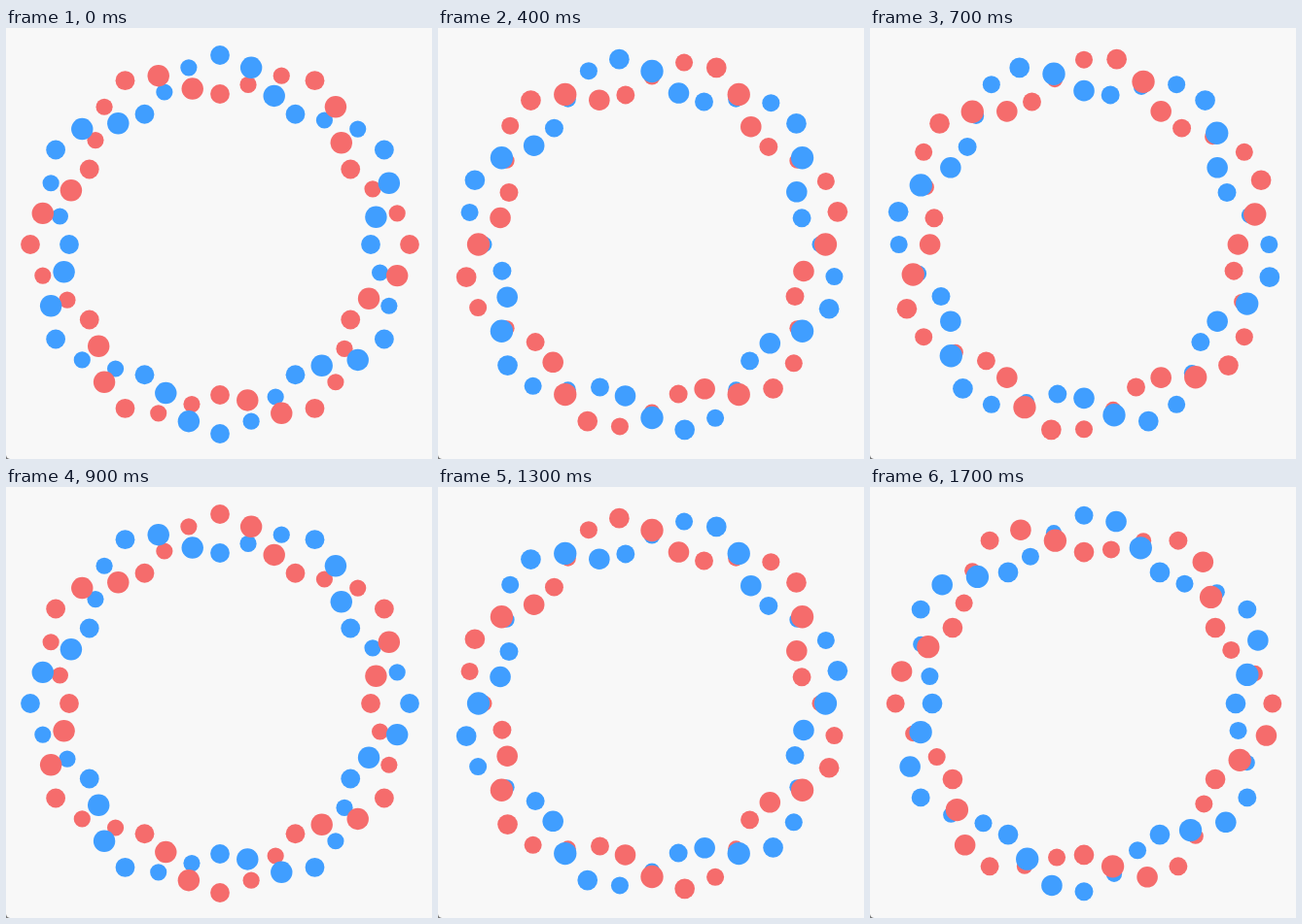
An HTML page with a canvas that plays this animation: 438 px wide and 444 px high, repeating every 1.8 s.

```html
<!DOCTYPE html>
<html lang="en">
<head>
<meta charset="utf-8">
<title>Twisted ring</title>
<style>
  html, body { margin: 0; width: 100%; height: 100%; overflow: hidden; background: #f8f8f8; }
  canvas { display: block; }
</style>
</head>
<body>
<canvas id="ring" width="438" height="444"></canvas>
<script>
const ctx = document.getElementById('ring').getContext('2d');
const LOOP = 1800, STEP = 100;
const CX = 220, CY = 223, RADIUS = 175, SWING = 20;
const SPOKES = 36, TWISTS = 6;
const BLUE = '#409eff', RED = '#f56c6c';
const TAU = Math.PI * 2;

// Distance from the centre; the inner half of the swing runs slightly ahead.
function reach(phase) {
  const c = Math.cos(phase), s = Math.sin(phase);
  return RADIUS + SWING * c - 6.5 * s ** 3 * Math.max(0, -c);
}

// Dots grow linearly towards the front and shrink towards the back.
function dotSize(phase) {
  return 9.9 * (1 + 0.2 * Math.asin(Math.sin(phase)) / (Math.PI / 2));
}

function drawDot(angle, phase, color) {
  const r = reach(phase);
  ctx.fillStyle = color;
  ctx.beginPath();
  ctx.arc(CX + r * Math.sin(angle), CY - r * Math.cos(angle), dotSize(phase), 0, TAU);
  ctx.fill();
}

function drawCorner() {
  ctx.fillStyle = '#777';
  ctx.beginPath();
  ctx.moveTo(0, 440);
  ctx.quadraticCurveTo(0.5, 443.5, 4, 444);
  ctx.lineTo(0, 444);
  ctx.fill();
}

function draw(time) {
  const turn = Math.floor(time / STEP) * STEP / LOOP * TAU;
  ctx.fillStyle = '#f8f8f8';
  ctx.fillRect(0, 0, 438, 444);
  drawCorner();

  const dots = [];
  for (let i = 0; i < SPOKES; i++) {
    const angle = i / SPOKES * TAU;
    const phase = turn + angle * TWISTS;
    dots.push([angle, phase, BLUE], [angle, phase + Math.PI, RED]);
  }
  dots.sort((a, b) => Math.sin(a[1]) - Math.sin(b[1]));
  dots.forEach(dot => drawDot(...dot));
}

const start = performance.now();
function tick() {
  draw((performance.now() - start) % LOOP);
  requestAnimationFrame(tick);
}
tick();
</script>
</body>
</html>
```
